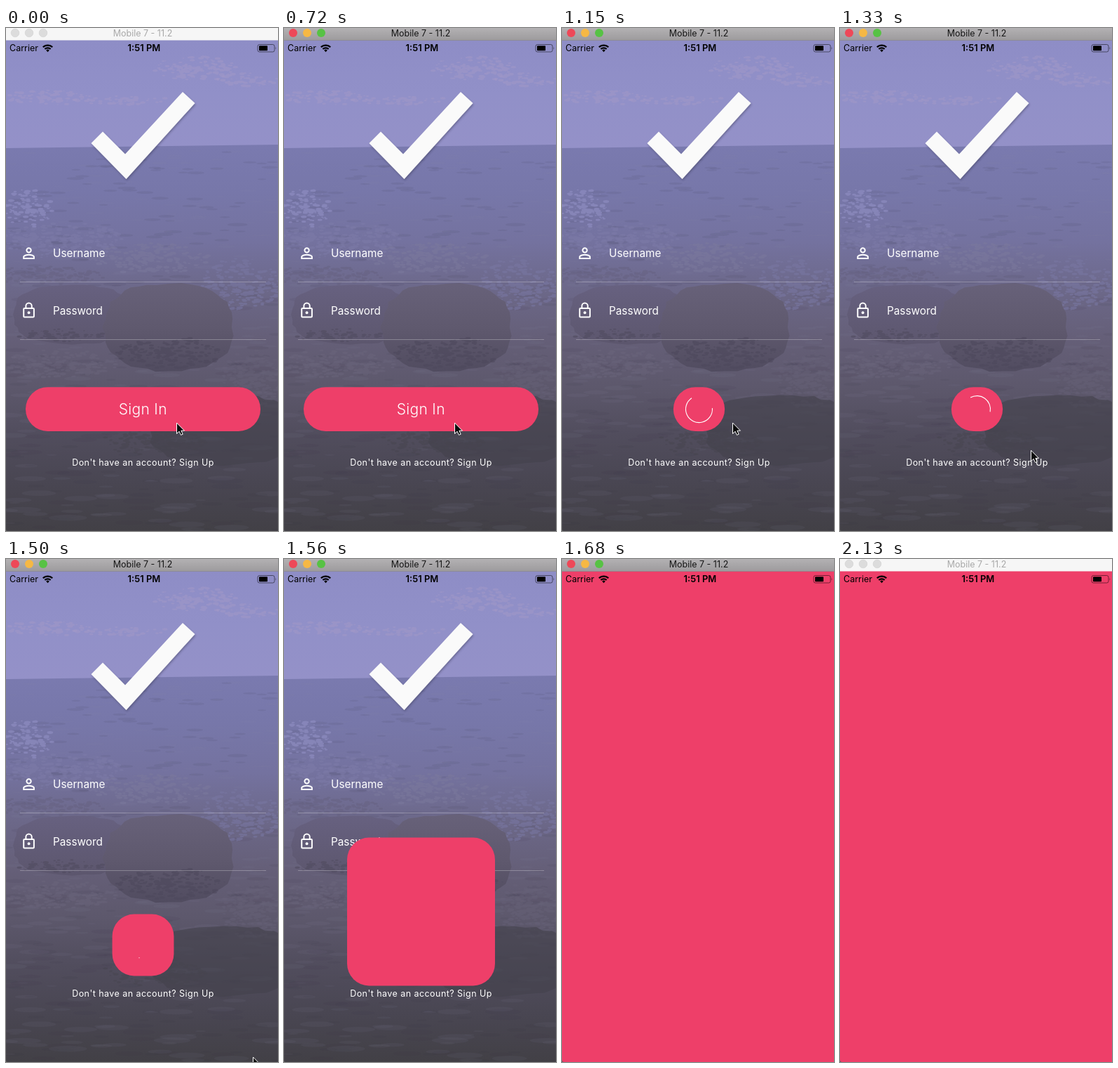
An HTML page with a canvas for the animation above (2230 ms loop, 388x716 px).

```html
<!DOCTYPE html>
<html lang="en">
<head>
<meta charset="utf-8">
<title>Sign in</title>
<style>
  html, body { margin: 0; width: 100%; height: 100%; overflow: hidden; }
  canvas, svg { position: absolute; left: 0; top: 0; display: block; }
  text { font-family: Inter, Roboto, sans-serif; }
  .mid { text-anchor: middle; }
  .on { display: none; }
  .active .on { display: inline; }
  .active .off { display: none; }
</style>
</head>
<body>
<canvas id="photo" width="388" height="716"></canvas>
<svg id="stage" width="388" height="716" viewBox="0 0 388 716">
  <defs>
    <linearGradient id="bar" x2="0" y2="1">
      <stop offset="0" stop-color="#b3b1b3"/><stop offset="1" stop-color="#9d9b9d"/>
    </linearGradient>
    <filter id="soft" x="-10%" y="-10%" width="120%" height="125%">
      <feDropShadow dx="1" dy="2" stdDeviation="1.5" flood-color="#33304a" flood-opacity=".4"/>
    </filter>
  </defs>

  <path d="M121.500 164L138 147.500L170 179.500L252 91L269.500 107L171.500 215Z" fill="#fafafa" filter="url(#soft)"/>

  <g fill="none" stroke="#fff" stroke-width="1.900">
    <g transform="translate(20 308) scale(1.047)">
      <circle cx="12" cy="8" r="3"/>
      <path d="M5 19V17c0-2 4.600-3 7-3s7 1 7 3v2z"/>
    </g>
    <g transform="translate(20 389.500) scale(1.047)">
      <path d="M8 9V6a4 4 0 0 1 8 0v3M6 9h12q1 0 1 1v10q0 1-1 1H6q-1 0-1-1V10q0-1 1-1z"/>
      <circle cx="12" cy="15" r="1"/>
    </g>
  </g>
  <g fill="#fff">
    <text x="67" y="326" font-size="15.300">Username</text>
    <text x="67" y="408" font-size="15.300">Password</text>
    <path d="M20 361h351v1H20zM20 443h351v1H20z" opacity=".27"/>
    <text class="mid" x="195.500" y="623" font-size="12.500" letter-spacing=".45">Don't have an account? Sign Up</text>
  </g>

  <rect id="button" fill="#ee3f69"/>
  <text id="label" class="mid" x="195.300" y="550" font-size="21" font-weight="300" letter-spacing=".3" fill="#fff">Sign In</text>
  <path id="spinner" fill="none" stroke="#fff" stroke-width="1.100"/>

  <g>
    <text x="5" y="33" font-size="12.500">Carrier</text>
    <path d="M52.800 27.300a9.500 9.500 0 0 1 13.400 0M55.400 30a5.800 5.800 0 0 1 8.200 0" fill="none" stroke="#000" stroke-width="2.300"/>
    <path d="M59.500 34.300l-2.300-2.500a3.200 3.200 0 0 1 4.600 0z"/>
    <text class="mid" x="197" y="33" font-size="13" font-weight="600">1:51 PM</text>
    <rect x="359" y="23.500" width="24" height="10.500" rx="2.500" fill="none" stroke="#000" stroke-opacity=".5"/>
    <rect x="361" y="25.300" width="12" height="7" rx=".8"/>
    <path d="M384.500 27q1.800 1.700 0 3.500z" opacity=".5"/>
  </g>

  <g class="off">
    <path d="M0 0h388v17.500H0z" fill="#f6f6f6"/>
    <g fill="#dcdcdc" stroke="#cfcfcf" stroke-width=".6">
      <circle cx="13" cy="7" r="5.800"/><circle cx="33" cy="7" r="5.800"/><circle cx="53" cy="7" r="5.800"/>
    </g>
    <text class="mid" x="195" y="12" font-size="12.500" fill="#a9a9a9">Mobile 7 - 11.2</text>
  </g>
  <g class="on">
    <path d="M0 0h388v17.500H0z" fill="url(#bar)"/>
    <path d="M0 17h388v.7H0z" fill="#8b898d"/>
    <circle cx="13" cy="7" r="6" fill="#ee4858"/>
    <circle cx="33" cy="7" r="6" fill="#f6b844"/>
    <circle cx="53" cy="7" r="6" fill="#57c244"/>
    <text class="mid" x="195" y="12" font-size="12.500" fill="#161616">Mobile 7 - 11.2</text>
  </g>
  <path d="M0 713q0 3 3 3H0z" fill="#555"/>

  <path id="cursor" d="M0 0V15.500L3.600 12.200L6 17.400L8.700 16.200L6.400 11.200H11Z" fill="#0a0a0a" stroke="#fff" stroke-width="1"/>
</svg>
<script>
const $ = id => document.getElementById(id);
const LOOP = 2230, W = 388, H = 716, CX = 195.5, PT = 1.047;
const part = (v, a, b) => Math.min(1, Math.max(0, (v - a) / (b - a)));

// cubic-bezier(.25, .1, .25, 1)
function ease(x) {
  let lo = 0, hi = 1;
  for (let i = 0; i < 20; i++) {
    const s = (lo + hi) / 2;
    if (0.75 * s * (1 - s) + s ** 3 < x) lo = s; else hi = s;
  }
  return 0.3 * lo * (1 - lo) ** 2 + 3 * lo * lo * (1 - lo) + lo ** 3;
}

function hold(t) {
  if (t < 920) return 0;
  const base = t < 1500 ? 910 : 1500;
  return base + 60 * Math.floor((t - base) / 60);
}

// squeeze to a pill, then grow with the first arc of a bounce
function buttonBox(time) {
  const v = time < 1500 ? 0.57 * (time - 900) / 600 : 0.57 + 0.00069 * (time - 1500);
  const z = part(v, 0.55, 0.999);
  const size = PT * (70 + 930 * (z < 4 / 11 ? 7.5625 * z * z : 1));
  if (size > 500 * PT) return { w: W + 4, h: H, cy: H / 2, r: 0 };

  const bottom = 574 + 50 * PT * ease(part(v, 0.5, 0.8));
  const h = z ? size : 60 * PT;
  const cy = bottom - h / 2;
  if (size > 300 * PT) {
    const d = Math.min(size, 375 * PT);
    return { w: d, h: d, cy, r: d / 2 };
  }
  const w = z ? size : PT * (320 - 250 * part(v, 0, 0.15));
  return { w, h, cy, r: 30 * PT };
}

function arc(cy, from, to) {
  const at = d => {
    const a = d * Math.PI / 180;
    return `${CX + 19 * Math.cos(a)} ${cy + 19 * Math.sin(a)}`;
  };
  return `M${at(from)}A19 19 0 ${to - from > 180 ? 1 : 0} 1 ${at(to)}`;
}

function set(el, attrs) {
  for (const k in attrs) el.setAttribute(k, attrs[k]);
}
function show(el, on) {
  el.style.display = on ? '' : 'none';
}

function render(t) {
  const time = hold(t), { w, h, cy, r } = buttonBox(time);
  $('stage').classList.toggle('active', t >= 720 && t < 2130);
  set($('button'), { x: CX - w / 2, y: cy - h / 2, width: w, height: h, rx: r });
  show($('label'), w > 80 && time < 1090);
  show($('spinner'), time >= 1090 && time <= 1500);

  // the head runs ahead in the first half turn, the tail catches up in the second
  const u = part(time, 1000, 1505), turn = 288 * u - 90;
  const head = turn + 270 * ease(part(u, 0, 0.5));
  const tail = turn + 270 * ease(part(u, 0.5, 1));
  set($('spinner'), { d: arc(cy, tail, head + 3) });

  const p = Math.max(0, (time - 1210) / 290) ** 1.5;
  set($('cursor'), { transform: `translate(${243.5 + 109 * p} ${562 + 147 * p})` });
}

function paintPhoto() {
  const c = $('photo').getContext('2d');
  let seed = 11;
  const rnd = () => (seed = seed * 16807 % 2147483647) / 2147483647;

  function fade(y0, y1, stops) {
    const g = c.createLinearGradient(0, y0, 0, y1);
    stops.forEach((s, i) => g.addColorStop(i / (stops.length - 1), s));
    return g;
  }
  function fleck(x, y, size, flat) {
    c.beginPath();
    c.ellipse(x, y, size, size * flat, 0, 0, 7);
    c.fill();
  }
  // one flat patch with a ragged rim, made of many small flecks
  function patch(x, y, rx, ry, color, alpha) {
    const layer = new Path2D();
    for (let i = 0; i < rx * ry / 8; i++) {
      const a = rnd() * 6.283, d = rnd() ** 0.7, s = 1 + rnd() * 3.5;
      const px = x + rx * d * Math.cos(a), py = y + ry * d * Math.sin(a);
      layer.moveTo(px + s, py);
      layer.ellipse(px, py, s, s * 0.45, 0, 0, 7);
    }
    c.globalAlpha = alpha;
    c.fillStyle = color;
    c.fill(layer);
    c.globalAlpha = 1;
  }
  function rock(x, y, rx, ry, fill) {
    c.fillStyle = fill;
    c.beginPath();
    for (let i = 0; i < 48; i++) {
      const a = i / 48 * 6.283, k = 0.97 + rnd() * 0.06;
      const bulge = s => Math.sign(s) * Math.abs(s) ** 0.8;
      c.lineTo(x + rx * k * bulge(Math.cos(a)), y + ry * k * bulge(Math.sin(a)));
    }
    c.fill();
  }

  c.fillStyle = fade(17, 170, ['#8e8dc6', '#9190c8', '#9491c8']);
  c.fillRect(0, 0, W, 180);
  const cloud = '#a39ac8';
  patch(270, 58, 58, 18, cloud, 0.5);
  patch(345, 74, 45, 10, cloud, 0.5);
  patch(60, 99, 62, 11, cloud, 0.5);
  patch(165, 102, 65, 7, cloud, 0.5);

  c.fillStyle = fade(167, H, ['#7a7aaf', '#7777a9', '#74729f', '#6c6889',
    '#655f78', '#5d586c', '#514d5d', '#494652', '#424046']);
  c.beginPath();
  c.moveTo(0, 171);
  c.lineTo(W, 166);
  c.lineTo(W, H);
  c.lineTo(0, H);
  c.fill();

  // ripples grow longer and rougher towards the viewer
  for (let i = 0; i < 500; i++) {
    const y = 175 + 540 * rnd(), near = y / H;
    c.fillStyle = rnd() < 0.5 ? 'rgba(145,138,170,.07)' : 'rgba(50,46,66,.08)';
    fleck(rnd() * W, y, 6 + 22 * near * rnd(), 0.16);
  }

  // breaking wave
  patch(32, 256, 34, 28, '#8f8ec2', 0.65);
  patch(80, 302, 85, 26, '#7f7da9', 0.5);
  patch(205, 328, 85, 22, '#7d7a9e', 0.5);
  patch(335, 365, 55, 38, '#7877a2', 0.6);
  patch(60, 352, 85, 14, '#625c7c', 0.4);

  rock(95, 408, 85, 42, fade(366, 452, ['#676180', '#5c566d']));
  rock(232, 426, 92, 62, fade(366, 488, ['#676179', '#5f596e', '#514c60']));
  patch(235, 462, 78, 22, '#4e495c', 0.6);
  patch(80, 438, 62, 10, '#514b60', 0.6);

  // foam and the dark shore
  patch(75, 478, 85, 20, '#6d677e', 0.4);
  patch(350, 500, 45, 42, '#666178', 0.4);
  rock(310, 572, 105, 50, 'rgba(68,65,75,.6)');
  patch(210, 590, 75, 18, '#47444f', 0.5);
}

paintPhoto();
const start = performance.now();
function tick() {
  render((performance.now() - start) % LOOP);
  requestAnimationFrame(tick);
}
tick();
</script>
</body>
</html>
```
